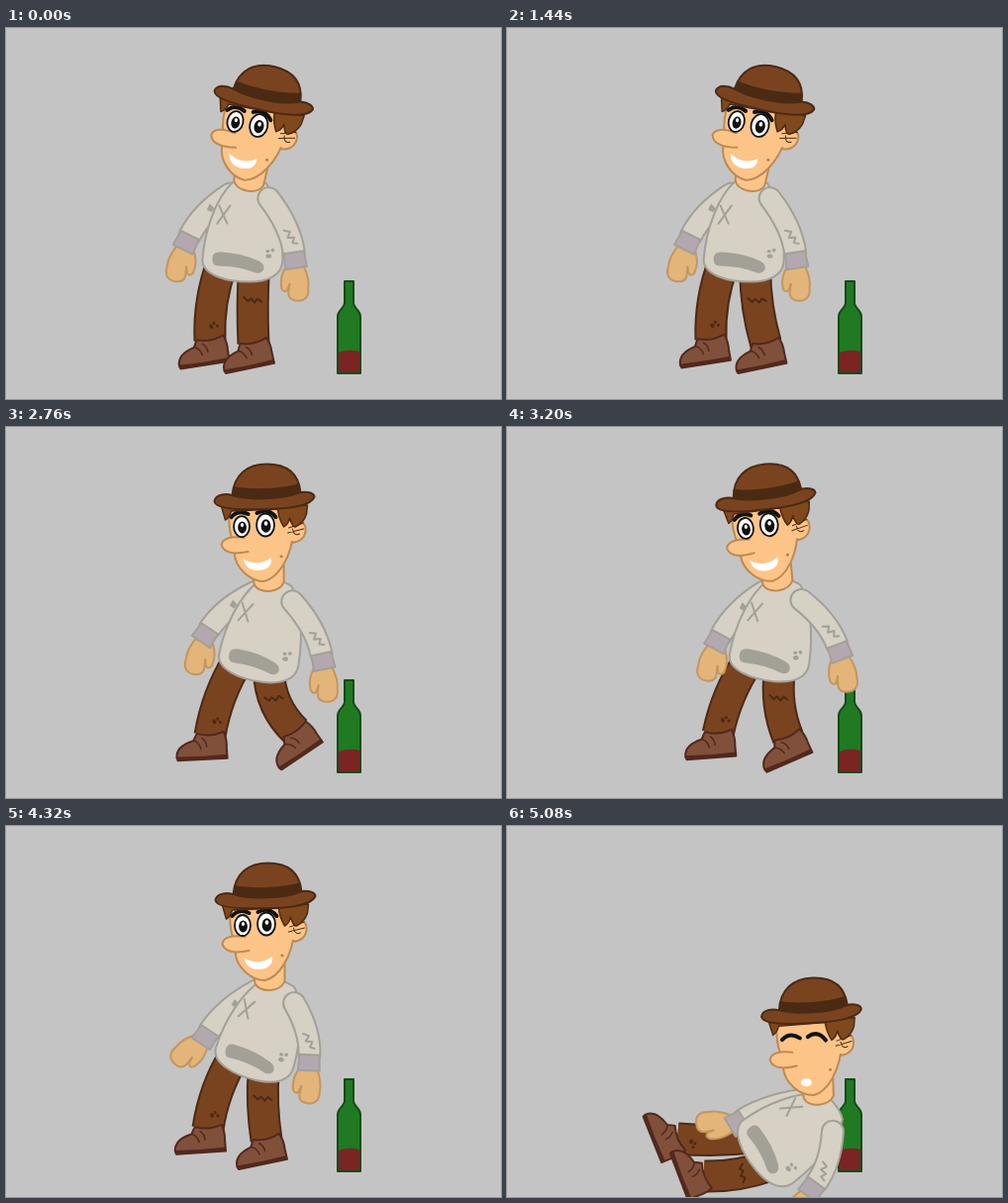
Recreate the animation shown at these times as an HTML page with a canvas. Size 500 by 375 pixels, loop 7000 ms.

```html
<!DOCTYPE html>
<html lang="en">
<head>
<meta charset="utf-8">
<title>Walk to the bottle</title>
<style>
  html, body { margin: 0; width: 100%; height: 100%; overflow: hidden; background: #c4c4c4; }
  canvas { display: block; }
</style>
</head>
<body>
<canvas id="stage" width="500" height="375"></canvas>
<script>
const ctx = document.getElementById('stage').getContext('2d');
const LOOP = 7000, STEP = 40, EYES_SHUT = 4680;

const C = {
  wool: '#d6d0c5', woolLine: '#a3a097', cuff: '#b4a8b0',
  skin: '#fdc488', skinLine: '#bb8b55', hand: '#e3b57a', handLine: '#c4965f',
  brown: '#7a4320', brownLine: '#4b2a13', shoe: '#81503b', shoeLine: '#51291d',
  hair: '#80491b'
};

const rad = deg => deg * Math.PI / 180;
const easeOut = u => 1 - (1 - u) ** 2;
const smooth = u => u * u * (3 - 2 * u);

function rotate(x, y, deg) {
  const c = Math.cos(rad(deg)), s = Math.sin(rad(deg));
  return [x * c - y * s, x * s + y * c];
}

const add = ([ax, ay], [bx, by]) => [ax + bx, ay + by];

// Every joint follows from a few overlapping moves, each running from 0 to 1.
function poseAt(t) {
  const ramp = (from, to) => Math.min(1, Math.max(0, (t - from) / (to - from)));
  const step = ramp(960, 2760), plant = ramp(2760, 3680), back = ramp(3680, 4320);
  const lift = ramp(1440, 2040), swing = ramp(2040, 2760);
  const reach = ramp(2760, 3120), settle = ramp(3120, 3680);
  const fall = easeOut(ramp(4320, 5080)), kick = easeOut(ramp(4320, 4800));

  const head = {
    pos: [260 + step + plant + 45.5 * fall, 74 + 116 * fall],
    angle: 13.2 - 20.7 * smooth(ramp(1400, 3680)) + 7.5 * back - 2 * fall
  };
  const lean = 7 * swing - 3 * plant + 9 * back + 37 * fall;
  const neck = add(head.pos, rotate(4.5, 92, head.angle));
  const chest = add(neck, rotate(0, 43.5, lean / 2 + 15 * fall));
  const joint = (x, y) => add(chest, rotate(x, y, lean));

  // The arms hang from the shoulders and turn with the torso.
  const swingL = lean + 42 - 10 * plant + 3 * back - 13 * fall;
  const swingR = lean - 23 - 11 * ramp(1440, 2760) - 9 * reach + 7 * settle + 9 * back - 3 * fall;
  const shoulderL = joint(-17, -40.5), shoulderR = joint(22, -36);

  return {
    head, chest, lean,
    armL: {
      from: shoulderL, to: add(shoulderL, rotate(0, 66 + 5 * plant + 8 * fall, swingL)),
      angle: 12 + 33 * back + 40 * fall, bend: -4.5
    },
    armR: {
      from: shoulderR, to: add(shoulderR, rotate(0, 68 - 6 * plant, swingR)),
      angle: (swingR + 25) * .6, bend: 4.5
    },
    legL: {
      from: joint(-25, 29.5),
      to: [206 + 15 * plant - 17 * back - 32 * kick, 316 - 4 * step - 4 * plant - 2 * back + 10 * kick],
      angle: -10 + 11 * lift - 5 * swing - 3 * plant + 2 * back + 72 * kick,
      bend: -4 + 6 * fall
    },
    legR: {
      from: joint(7, 36.5),
      to: [250 + 43 * step - 19 * plant - 11 * back - 64 * kick,
           319 - 11 * ramp(1440, 2760) + 12 * plant - 3 * back + 37 * kick],
      angle: -13 + 10 * lift - 32 * swing + 22 * plant + 81 * kick,
      bend: -1 - 6 * step + 5 * plant + 5 * fall
    }
  };
}

function shape(d, fill, line, width = 2) {
  const path = new Path2D(d);
  if (fill) { ctx.fillStyle = fill; ctx.fill(path); }
  if (line) { ctx.strokeStyle = line; ctx.lineWidth = width; ctx.stroke(path); }
}

function oval(x, y, rx, ry, fill, line, width = 2) {
  ctx.beginPath();
  ctx.ellipse(x, y, rx, ry, 0, 0, 7);
  ctx.fillStyle = fill;
  ctx.fill();
  if (line) { ctx.strokeStyle = line; ctx.lineWidth = width; ctx.stroke(); }
}

function at([x, y], deg, draw) {
  ctx.save();
  ctx.translate(x, y);
  ctx.rotate(rad(deg));
  draw();
  ctx.restore();
}

// Draws a soft limb with a mark at u along it; returns the angle of its end.
function limb({ from: [ax, ay], to: [bx, by], bend }, width, trim, cap, fill, line, u, mark) {
  const len = Math.hypot(bx - ax, by - ay);
  const cx = (ax + bx) / 2 + 2 * bend * (by - ay) / len;
  const cy = (ay + by) / 2 - 2 * bend * (bx - ax) / len;
  const angle = Math.atan2(by - cy, bx - cx) * 180 / Math.PI - 90;
  const [ex, ey] = add([bx, by], rotate(0, -trim, angle));
  const d = `M${ax} ${ay}Q${cx} ${cy} ${ex} ${ey}`;
  ctx.save();
  ctx.lineCap = cap;
  shape(d, null, line, width + 2);
  shape(d, null, fill, width - 2);
  ctx.restore();
  const mix = (a, c, b) => (1 - u) ** 2 * a + 2 * u * (1 - u) * c + u * u * b;
  const slope = Math.atan2(mix(ay, cy, by) - ay, mix(ax, cx, bx) - ax) * 180 / Math.PI - 90;
  at([mix(ax, cx, bx), mix(ay, cy, by)], slope, mark);
  return angle;
}

function bottle() {
  shape('M342 256H351V278C351 284 358 284 358 292V349H335V292C335 284 342 284 342 278Z', '#207a22', '#154a18');
  shape('M336 328Q346 324 357 327V348H336Z', '#7b2424');
}

function spots(color) {
  oval(-2, -2, 2, 1.7, color);
  oval(3, -3, 1.8, 1.8, color);
  oval(-1, 3, 2.9, 2.2, color);
}

function leg(pose, u, mark) {
  limb(pose, 31, 0, 'butt', C.brown, C.brownLine, u, mark);
  at(pose.to, pose.angle, () => {
    shape('M-35 20C-35 10 -26 6 -17 4Q-15 0 -13 -3Q0 2 14 -3Q17 5 16 13V24L-34 23Z', C.shoe, C.shoeLine);
    shape('M-35 19Q-10 21 16 20V24L-34 23Z', C.shoeLine);
    shape('M-16 4Q-11 7 -10 13M-8 2Q-4 5 -4 11', null, C.shoeLine, 1.5);
  });
}

function arm(pose, side, u, mark) {
  const end = limb(pose, 22, 8, 'round', C.wool, C.woolLine, u, mark);
  at(pose.to, pose.angle, () => {
    ctx.scale(side, 1);
    shape('M-9 6C-13 14 -15 20 -13 29Q-10 34 -7 30L-5 24L-6 33C-6 40 -1 41 4 41C11 41 15 36 14 28C15 20 12 12 9 6Z',
      C.hand, C.handLine);
  });
  at(pose.to, end, () => shape('M-10 -8H10L11 8H-11Z', C.cuff, C.woolLine));
}

function torso({ chest, lean }) {
  at(chest, lean, () => {
    ctx.translate(-243, -208.5);
    shape('M229 156C212 172 200 205 198 235C198 250 222 257 245 257C265 257 279 250 279 235C280 205 274 172 262 157C252 152 238 152 229 156Z',
      C.wool, C.woolLine);
    shape('M208 234Q208 226 217 227Q238 228 255 236Q261 239 260 244Q258 249 252 248Q235 241 214 241Q208 241 208 234Z', C.woolLine);
    shape('M215 180L223 198M226 180L213 198', null, C.woolLine);
    at([266, 228], 0, () => spots(C.woolLine));
  });
}

function eye(x, y, rx, ry) {
  oval(x, y, rx, ry, '#fff', '#111', 1.8);
  oval(x + .5, y + 1, rx * .55, ry * .58, '#111');
  oval(x + .5, y - 1.5, rx * .2, ry * .2, '#fff');
}

function face(shut) {
  if (shut) {
    shape('M231 99Q239 91 249 98M257 97Q267 90 275 101', null, '#111', 4);
    oval(254, 143, 5.5, 4, '#fff');
    return;
  }
  eye(238.5, 100.5, 8, 10.5);
  eye(262.5, 99, 9, 11.5);
  shape('M228 91Q235 83 245 88M254 87Q265 81 273 91', null, '#111', 4);
  shape('M240 133C248 139 260 139 268 132C270 140 264 145 254 145C246 145 241 140 240 133Z', '#fff');
}

function head({ pos, angle }, shut) {
  at(pos, angle, () => {
    ctx.translate(-261.5, -74);
    shape('M249 146L251 159Q254 166 266 166Q278 165 281 157L281 140', C.skin, C.skinLine);
    shape('M285 99C290 93 302 94 303 102C304 112 296 119 284 116Z', C.skin, C.skinLine);
    shape('M226 82C225 95 226 105 229 114L231 127C232 143 247 156 261 156C275 153 289 132 291 104L290 80Z', C.skin, C.skinLine);
    shape('M285 97H293L294 115H286Z', C.skin);
    shape('M286 102L301 97M285 107L301 103M290 103Q291 111 297 108', null, C.brownLine, 1);
    shape('M241 112C229 110 219 112 218 119C220 127 230 129 245 126', C.skin, C.skinLine);
    oval(278.5, 131, 1.6, 1.4, '#b97d46');
    face(shut);
    shape('M218 80L222 94Q226 92 228 85L275 83Q276 93 281 101Q286 98 287 92Q290 102 293 101Q301 97 304 88L305 79Z',
      C.hair, C.brownLine, 1.5);
    shape('M211 75C212 68 222 67 229 69L298 66C306 65 312 67 312 71C308 80 285 83 262 83C235 84 212 83 211 75Z', C.brown, C.brownLine);
    shape('M229 69C231 48 244 37.5 264 37.5C284 37.5 296 47 298 66C280 74 245 74 229 69Z', C.brown, C.brownLine);
    shape('M230 60C250 64 280 62 297 57L298 66C280 74 245 74 229 69Z', C.brownLine);
  });
}

function render(t) {
  const pose = poseAt(t);
  ctx.fillStyle = '#c4c4c4';
  ctx.fillRect(0, 0, 500, 375);
  ctx.lineJoin = 'round';
  ctx.lineCap = 'round';
  bottle();
  leg(pose.legL, .8, () => at([4, 0], 40, () => {
    ctx.scale(.85, .85);
    spots(C.brownLine);
  }));
  leg(pose.legR, .4, () => shape('M-9 -2L-5 2L-2 -1L2 3L5 -1L9 2', null, C.brownLine));
  arm(pose.armL, -1, .38, () => shape('M-5 -3L2 -4L3 1L-2 3Z', C.woolLine));
  torso(pose);
  head(pose.head, t >= EYES_SHUT);
  arm(pose.armR, 1, .66, () => shape('M-2 -9L3 -5L-2 -1L4 2L0 6L4 9', null, C.woolLine));
}

function frame() {
  const t = performance.now() % LOOP;
  render(Math.floor(t / STEP) * STEP);
  requestAnimationFrame(frame);
}
frame();
</script>
</body>
</html>
```
